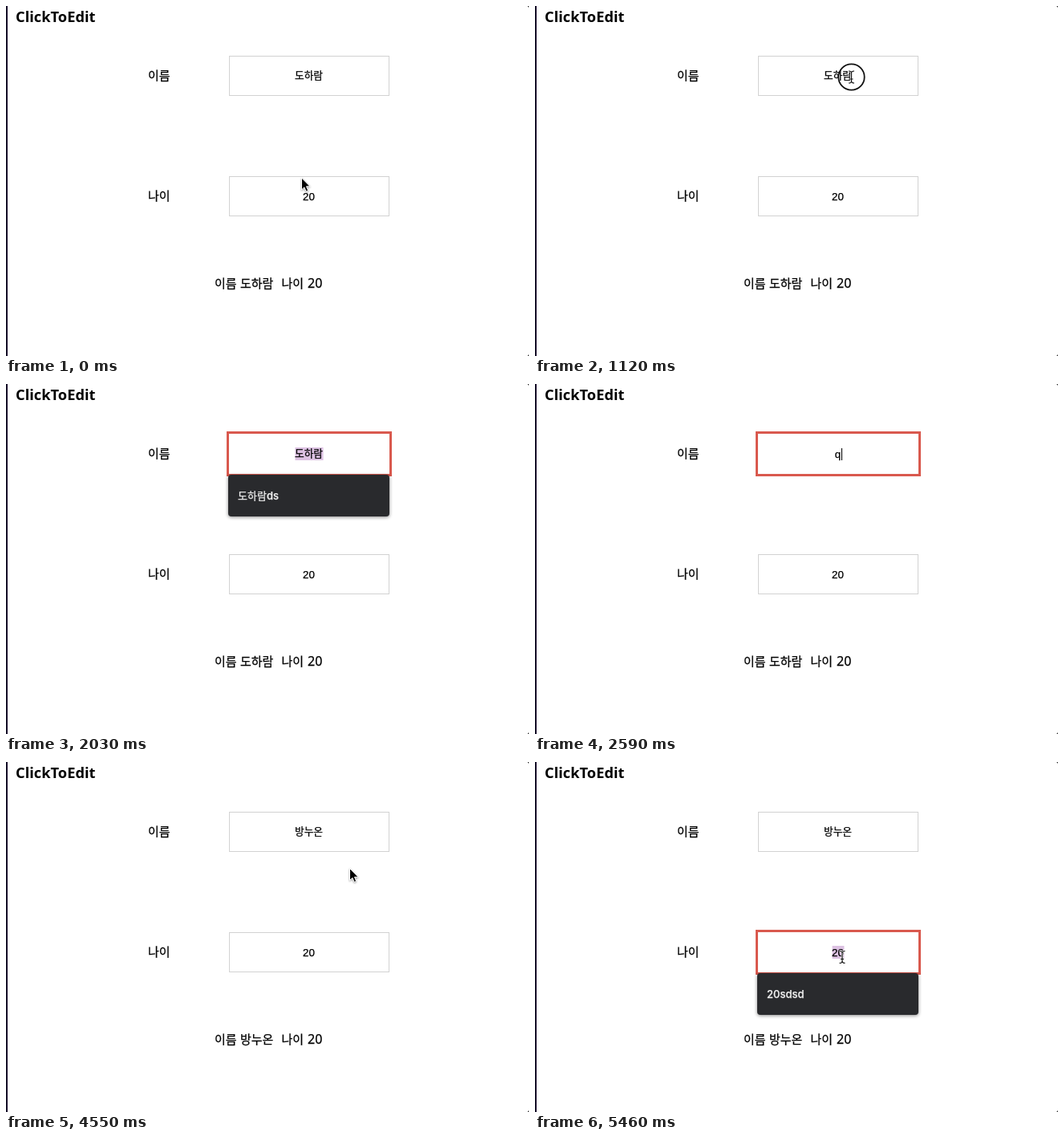
An HTML page for the animation above (8 s loop, 652x436 px).

```html
<!DOCTYPE html>
<html lang="ko">
<head>
<meta charset="utf-8">
<title>ClickToEdit</title>
<style>
  html, body { margin: 0; width: 100%; height: 100%; overflow: hidden; background: #fff; }
  svg { display: block; }
  text { font: 15px "Noto Sans", "Noto Sans CJK KR", "Noto Sans CJK", sans-serif; white-space: pre; stroke: #000; stroke-width: .25; }
  .title { font-size: 18.3px; font-weight: 600; stroke: none; }
  .number { font-size: 16px; }
  .value { font: 13.333px "Liberation Sans", "Noto Sans CJK KR", "Noto Sans CJK", sans-serif; text-anchor: middle; }
  .hangul { font-size: 12.7px; }
  .option { font: 500 13px Inter, "Noto Sans CJK KR", "Noto Sans CJK", sans-serif; fill: #f1f1f1; stroke: #f1f1f1; }
  .menu { fill: #292a2d; filter: drop-shadow(0 1px 2px #0007); }
  .arrow { filter: drop-shadow(0 1px 1px #0006); }
</style>
</head>
<body>
<svg id="stage" width="652" height="436" viewBox="0 0 652 436"></svg>
<script>
const LOOP = 8000, STEP = 70, MID = 378;
const OLD = '도하람', NEW = '방누온';
const stage = document.getElementById('stage');

// Contents of the name field: start time, text
const typing = [
  [0, OLD], [2100, 'q'], [2240, 'qk'], [2590, 'q'], [2730, ''], [2800, 'ㅂ'], [3220, '바'],
  [3430, '방'], [3500, '방ㄴ'], [3570, '방누'], [3710, '방누오'], [3780, NEW]
];
// Pointer moves: start, end, then start, control and end points
const moves = [
  [0, 560, [368, 213.5], [425, 45], [394, 88]],
  [4130, 4270, [394, 88], [414, 105], [428, 132]],
  [4900, 5180, [428, 132], [415, 200], [382.5, 242.5]]
];
const clicks = [[910, 1190], [4270, 4550], [5180, 5390]];

const within = (t, a, b) => t >= a && t < b;
const text = (x, y, s, cls = '') => `<text x="${x}" y="${y}" class="${cls}">${s}</text>`;
const rect = (x, y, w, h, more) => `<rect x="${x}" y="${y}" width="${w}" height="${h}" ${more}/>`;
const widthOf = s => [...s].reduce((w, c) => w + (c > 'z' ? 11.7 : 7.4), 0);

function field(y, value, { editing, selected, option }) {
  const w = widthOf(value), end = Math.round(MID + w / 2), hangul = value > 'z';
  let out = editing
    ? rect(276.5, y - 1.5, 203, 53, 'fill="#fff" stroke="#d9594e" stroke-width="3"')
    : rect(278.5, y + .5, 199, 49, 'fill="#fff" stroke="#d2d2d2"');
  if (selected) out += rect(MID - w / 2, y + 17, w, 16, 'fill="#dcc1e2"');
  out += text(MID - .5, y + (hangul ? 29 : 30), value, hangul ? 'value hangul' : 'value');
  if (editing && !selected) {
    out += rect(end, y + 18, 1, 15, '');
    if (hangul) out += rect(end - 12, y + 32, 11, 1, '');
  }
  if (option) out += rect(277, y + 51, 201, 52, 'rx="4" class="menu"') + text(289, y + 82, option, 'option');
  return out;
}

function pointer(t) {
  const [a, b, p, c, q] = moves.findLast(m => t >= m[0]);
  const k = Math.min(1, (t - a) / (b - a)), u = k * k * (3 - 2 * k);
  const [x, y] = [0, 1].map(i => (1 - u) ** 2 * p[i] + 2 * u * (1 - u) * c[i] + u * u * q[i]);
  const overText = Math.abs(x - MID) < 18 && (Math.abs(y - 87) < 10 || Math.abs(y - 237) < 10);
  const beam = overText || (within(t, 1190, 4270) && y < 112);
  const click = clicks.find(([from, to]) => within(t, from, to));
  const ibeam = 'M-3.5-7.5Q0-7.5 0-5Q0-7.5 3.5-7.5M0-5V5M-3.5 7.5Q0 7.5 0 5Q0 7.5 3.5 7.5M-2 2.5H2';
  let out = beam
    ? `<path d="${ibeam}" fill="none" stroke="#fff" stroke-width="2.6"/><path d="${ibeam}" fill="none" stroke="#111" stroke-width="1.2"/>`
    : '<path class="arrow" d="M0 0V15L3.4 11.8L5.6 17L8.2 16L6 10.8H10.6Z" stroke="#fff"/>';
  if (click) {
    const r = 16.2 * Math.min(1, (t - click[0] + STEP) / 210);
    out += `<circle r="${r}" fill="none" stroke="#111" stroke-width="1.8"/>`;
  }
  return `<g transform="translate(${x + .5} ${y + .5})">${out}</g>`;
}

function draw(t) {
  const value = typing.findLast(s => t >= s[0])[1];
  const editName = within(t, 1190, 4340), editAge = t >= 5390;
  stage.innerHTML =
    rect(0, 0, 2, 436, 'fill="#160528"') +
    '<path d="M650 0H652V2ZM652 434V436H650Z" fill="#444"/>' +
    text(12, 20, 'ClickToEdit', 'title') +
    text(177, 92, '이름') + text(177, 242, '나이') +
    text(260, 351, '이름') + text(292, 351, t < 4340 ? OLD : NEW) +
    text(343.5, 351, '나이') + text(376, 351, '20', 'number') +
    field(62, value, {
      editing: editName,
      selected: within(t, 1190, 2100),
      option: within(t, 1260, 2100) && OLD + 'ds'
    }) +
    field(212, '20', { editing: editAge, selected: editAge, option: t >= 5460 && '20sdsd' }) +
    (within(t, 2030, 4130) ? '' : pointer(t));
}

let start, last = -1;
function tick(now) {
  start ??= now;
  const t = Math.floor((now - start) % LOOP / STEP) * STEP;
  if (t !== last) draw(last = t);
  requestAnimationFrame(tick);
}
draw(0);
requestAnimationFrame(tick);
</script>
</body>
</html>
```
